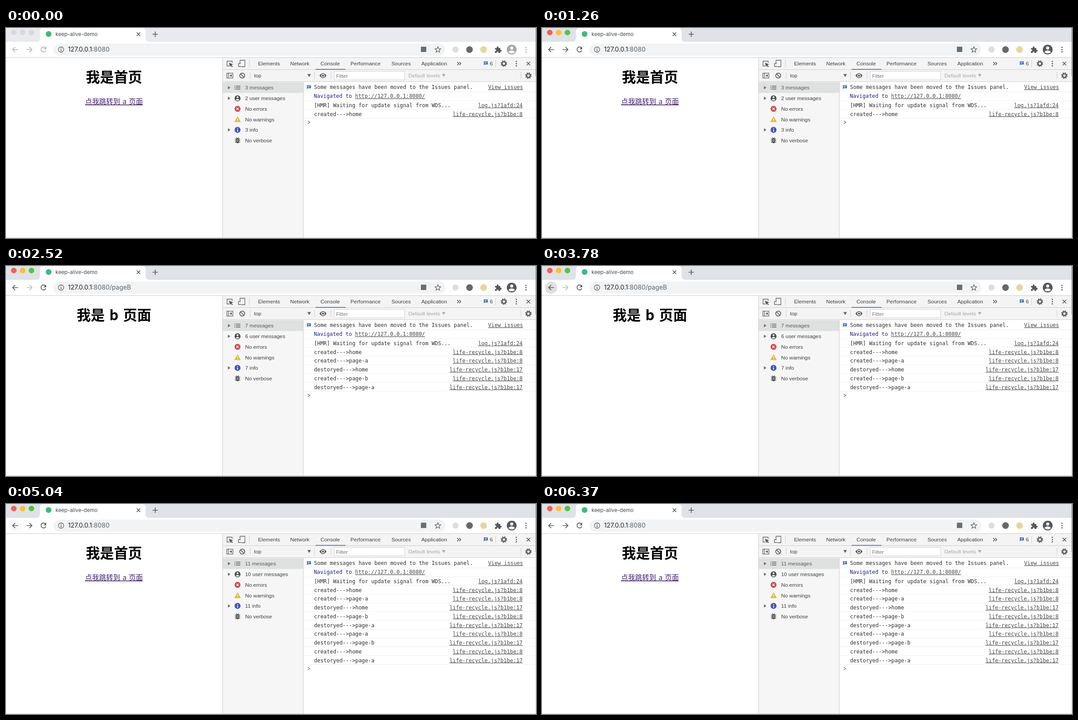
An HTML page that plays this animation: 1188 px wide and 472 px high, repeating every 6.44 s.

```html
<!DOCTYPE html>
<html lang="zh-CN">
<head>
<meta charset="utf-8">
<title>keep-alive-demo</title>
<style>
html, body { margin: 0; height: 100%; overflow: hidden; background: #fff; }
svg { display: block; width: 100vw; height: 100vh; }
text { white-space: pre; }
.bar { font: 11.7px Inter, sans-serif; fill: #45494d; }
.url { font: 14.15px Inter, sans-serif; fill: #202124; }
.page { font-family: "Noto Sans CJK SC", "Noto Sans CJK", sans-serif; text-anchor: middle; word-spacing: .1em; }
#title { font-size: 31.5px; font-weight: 700; }
#link { font-size: 15.76px; fill: #43246e; text-decoration: underline; }
.ui { font: 11.8px "Liberation Sans", Arial, sans-serif; fill: #3e3e3e; }
.log { font: 11.84px "DejaVu Sans Mono", monospace; fill: #303030; }
.src { text-anchor: end; text-decoration: underline; fill: #484848; }
.line { fill: none; stroke: #53575b; stroke-width: 1.7; }
.thin { fill: none; stroke: #606060; stroke-width: 1.3; }
.rule { stroke: #ccc; }
.row { stroke: #efefef; }
</style>
</head>
<body>
<svg viewBox="0 0 1188 472" preserveAspectRatio="none">
  <defs>
    <g id="gear" fill="none" stroke="#5c5c5c">
      <circle r="4" stroke-width="2.6"/>
      <circle r="6" stroke-width="2.4" stroke-dasharray="2.6 2.11"/>
    </g>
    <g id="dots"><circle cy="-5" r="1.5"/><circle r="1.5"/><circle cy="5" r="1.5"/></g>
    <g id="chat"><path d="M-4.5-4h9v7h-7l-2 2z" fill="#3e6fc4"/><path d="M-2.5-1.800h5M-2.500.500h3.500" stroke="#fff"/></g>
    <path id="expand" d="M-2.5-3.8L3 0L-2.5 3.8z" fill="#6e6e6e"/>
  </defs>

  <!-- tab strip -->
  <rect id="strip" width="1188" height="31"/>
  <path d="M68 31q8 0 8-8V8q0-8 8-8h221q8 0 8 8v15q0 8 8 8z" fill="#fff"/>
  <g id="lights"><circle cx="17.5" cy="10.2" r="6.2"/><circle cx="37.3" cy="10.2" r="6.2"/><circle cx="57" cy="10.2" r="6.2"/></g>
  <circle cx="95.5" cy="13.5" r="6.5" fill="#41b883"/>
  <text class="bar" x="111" y="18">keep-alive-demo</text>
  <path class="line" d="M293 10l8 8m0-8l-8 8M328.5 14h12m-6-6v12"/>

  <!-- toolbar -->
  <circle id="hover" cx="20.5" cy="48.5" r="13.8" fill="#dfe0e2"/>
  <path id="back" class="line" d="M27 48.5H15m5.5-5.7l-5.7 5.7l5.7 5.7"/>
  <path id="forward" class="line" d="M46 48.5h12m-5.5-5.7l5.7 5.7l-5.7 5.7"/>
  <g id="reload"><path class="line" d="M88.5 44.5a5.7 5.7 0 1 0 1 5.8"/><path d="M90 42v5.8h-5.8z" fill="#53575b"/></g>
  <rect x="106" y="35" width="879" height="27" rx="13.5" fill="#f1f3f4"/>
  <circle class="thin" cx="123.5" cy="48.5" r="6"/>
  <path class="line" d="M123.5 44.7v1.6m0 1.4v4.5"/>
  <text class="url" x="139" y="53">127.0.0.1<tspan id="path" fill="#5f6368"></tspan></text>
  <rect x="930" y="42" width="12" height="12" fill="#6a6e72"/>
  <path class="thin" d="M968 42l1.9 4.3l4.6.4l-3.5 3.1l1.1 4.6l-4.1-2.5l-4.1 2.5l1.1-4.6l-3.5-3.1l4.6-.4z"/>
  <circle cx="1007.5" cy="48.5" r="7" fill="#dedede"/>
  <circle cx="1039" cy="48.5" r="7.5" fill="#66696c"/>
  <circle cx="1070.5" cy="48.5" r="7.5" fill="#e3d6a0"/>
  <path d="M1096 45h4v-1.5a2 2 0 0 1 4 0V45h4v4h1a2 2 0 0 1 0 4h-1v3h-4v-1a2 2 0 0 0-4 0v1h-4v-4h1a2 2 0 0 0 0-4h-1z" fill="#55595d"/>
  <g id="user"><circle cx="1133.5" cy="48.5" r="11"/><circle cx="1133.5" cy="45" r="3.4" fill="#fff"/><path d="M1126.5 54.5c1-5.5 13-5.5 14 0q-7 5-14 0" fill="#fff"/></g>
  <use id="menu" href="#dots" x="1165.5" y="48.5" fill="#55595d"/>
  <path class="rule" d="M0 66.5h1188"/>

  <!-- page -->
  <text id="title" class="page" x="242" y="122"></text>
  <text id="link" class="page" x="242" y="171"></text>

  <!-- inspector -->
  <rect x="485" y="67" width="703" height="54" fill="#f4f4f4"/>
  <rect x="485" y="121" width="181" height="351" fill="#f6f6f6"/>
  <rect x="486" y="122" width="180" height="24" fill="#dfe0e0"/>
  <path class="rule" d="M485.5 67v405M485 93.5h703M485 120.5h703M666.5 121v351M545.5 72v16M1097.5 72v16M547.5 99v16M691.5 99v16M728.5 99v16M1154.5 99v16"/>
  <rect x="694" y="92" width="67" height="2" fill="#5487bd"/>
  <path class="thin" d="M500 85.5h-4.5v-11h11.5v4M527 86.5h-6v-6.5h5M524.5 79v-6.5h11V87h-8"/>
  <path d="M500 78l9 4l-3.6 1.4l3 3.2l-1.5 1.3l-3-3.2l-1.7 3z" fill="#555"/>
  <g id="tabs" class="ui"></g>
  <path class="line" d="M1011.5 76.5l3.3 3.5l-3.3 3.5m4.6-7l3.3 3.5l-3.3 3.5"/>
  <use href="#chat" x="1075.5" y="79"/>
  <text class="ui" x="1084.5" y="84">6</text>
  <use href="#gear" x="1116" y="80"/>
  <use href="#dots" x="1144" y="80" fill="#555"/>
  <path class="line" d="M1167 76l8 8m0-8l-8 8"/>

  <rect class="thin" x="495" y="101.5" width="13.5" height="11"/>
  <path class="thin" d="M498.5 102v10"/>
  <path d="M506 104v6l-5-3z" fill="#555"/>
  <path class="line" d="M525.5 103l8 8"/><circle class="line" cx="529.5" cy="107" r="5.6"/>
  <text class="ui" x="556" y="111">top</text>
  <path d="M675.5 103.5h8l-4 6.5z" fill="#606060"/>
  <path d="M702.5 107q8-11 16 0q-8 11-16 0" fill="#5a5a5a"/>
  <circle cx="710.5" cy="107" r="3.1" fill="#5a5a5a" stroke="#f4f4f4" stroke-width="1.6"/>
  <rect x="735.5" y="97.5" width="158" height="19" fill="#fff" stroke="#d2d2d2"/>
  <text class="ui" x="740" y="111.5" style="fill:#777">Filter</text>
  <text class="ui" x="902" y="111" style="fill:#a8a8a8">Default levels</text>
  <path d="M977.5 103.5h7.5l-3.7 6.5z" fill="#a8a8a8"/>
  <use href="#gear" x="1171" y="107"/>

  <!-- sidebar -->
  <use href="#expand" x="500" y="134"/><use href="#expand" x="500" y="158"/><use href="#expand" x="500" y="229"/>
  <path class="thin" d="M512 130.5h1.8m1.5 0h10M512 134h1.8m1.5 0h10M512 137.5h1.8m1.5 0h10"/>
  <circle cx="519" cy="158" r="6.7" fill="#505050"/><circle cx="519" cy="155.7" r="2.1" fill="#fff"/><path d="M514.8 161.5q4.2-4 8.4 0q-4.2 3-8.4 0" fill="#fff"/>
  <circle cx="519" cy="181.7" r="6.7" fill="#cf4b4f"/><path d="M516.5 179.2l5 5m0-5l-5 5" stroke="#fff" stroke-width="1.5"/>
  <path d="M519 198.3l7.3 13.2h-14.6z" fill="#e0b83c"/><path d="M519 203v4m0 1.2v1.6" stroke="#fff" stroke-width="1.5"/>
  <circle cx="519" cy="229" r="6.7" fill="#4257b2"/><path d="M519 225v1.8m0 1.4v5" stroke="#fff" stroke-width="1.8"/>
  <path class="thin" d="M513 249.5h12m-12 3.5h12m-12 3.5h12M516 246l2 2.5m4-2.5l-2 2.5"/><rect x="515.5" y="247.5" width="7" height="11.5" rx="3.5" fill="#555"/><path d="M517.5 251.5h3m-3 3h3" stroke="#f6f6f6"/>
  <g id="counts" class="ui"></g>

  <!-- console -->
  <use href="#chat" x="679" y="132.5"/>
  <text class="log" x="690.5" y="137">Some messages have been moved to the Issues panel.</text>
  <text class="log src" x="1159" y="137">View issues</text>
  <text class="log" x="690" y="157.3" style="fill:#1f1f86">Navigated to <tspan fill="#484848" text-decoration="underline">http://127.0.0.1:8080/</tspan></text>
  <path class="row" d="M667 143.5h520M667 163.5h520"/>
  <g id="rows"></g>
  <path id="prompt" d="M676.5-3.3l4.5 3.3l-4.5 3.3" fill="none" stroke-width="1.4"/>

  <path d="M1187.5 0v108" stroke="#85878a"/><path d="M1187.5 108v364M0 471.5h1188" stroke="#d5d5d5"/>
</svg>
<script>
const $ = id => document.getElementById(id);
const LOOP = 6440, FOCUS = 1000, LAG = 70, STEP = 19.75;
const pages = {
  home: ["", "我是首页", "点我跳转到 a 页面"],
  "page-a": ["/pageA", "我是 a 页面", "点我跳转到 b 页面"],
  "page-b": ["/pageB", "我是 b 页面", ""]
};
const visits = [[0, "home"], [2000, "page-a"], [2430, "page-b"], [4060, "page-a"], [4480, "home"]];

const label = (x, y, s) => `<text x="${x}" y="${y}">${s}</text>`;
$("tabs").innerHTML = [[565, "Elements"], [637, "Network"], [705, "Console"], [772, "Performance"],
  [864, "Sources"], [931, "Application"]].map(([x, s]) => label(x, 84, s)).join("");
$("counts").innerHTML = ["", "", "No errors", "No warnings", "", "No verbose"]
  .map((s, i) => label(536, 138.3 + i * 23.75, s)).join("");
const counts = $("counts").children;
counts[0].style.fill = "#585858";

const logs = [["[HMR] Waiting for update signal from WDS...", "log.js?1afd:24"]];
visits.forEach(([, name], i) => {
  logs.push(["created---&gt;" + name, "life-recycle.js?b1be:8"]);
  if (i) logs.push(["destoryed---&gt;" + visits[i - 1][1], "life-recycle.js?b1be:17"]);
});
$("rows").innerHTML = logs.map(([msg, src], i) => {
  const y = 177.8 + i * STEP;
  return `<g><text class="log" x="690.5" y="${y}">${msg}</text>
    <text class="log src" x="1158" y="${y}">${src}</text>
    <path class="row" d="M667 ${Math.floor(y + 4.7) + .5}h520"/></g>`;
}).join("");
const rows = [...$("rows").children], lights = [...$("lights").children];

const clamp = v => Math.max(0, Math.min(1, v));
const visitAt = t => visits.filter(v => v[0] <= Math.max(0, t)).length - 1;
const put = (el, s) => { if (el.textContent !== s) el.textContent = s; };

function draw(t) {
  const focused = t >= FOCUS, visit = visitAt(t), logged = visitAt(t - LAG);
  const [path, title, link] = pages[visits[visit][1]];
  put($("path"), ":8080" + path);
  put($("title"), title);
  put($("link"), link);

  const total = 3 + 2 * visit, shown = 2 + 2 * logged;
  put(counts[0], total + " messages");
  put(counts[1], total - 1 + " user messages");
  put(counts[4], total + " info");
  rows.forEach((r, i) => r.style.display = i < shown ? "" : "none");
  $("prompt").setAttribute("transform", `translate(0 ${172.5 + shown * STEP})`);
  $("prompt").setAttribute("stroke", logged > 3 ? "#777" : "#5865b5");

  $("strip").setAttribute("fill", focused ? "#dfe2e6" : "#e8eaed");
  lights.forEach((c, i) => c.setAttribute("fill", focused ? ["#f25f58", "#f9be3e", "#55c344"][i] : "#d8d9dc"));
  const dim = focused ? 1 : .45;
  for (const id of ["back", "reload", "menu"]) $(id).style.opacity = dim;
  $("forward").style.opacity = logged === 1 || logged === 2 ? .4 : dim;
  $("user").setAttribute("fill", focused ? "#54585c" : "#a4a6a8");
  $("hover").style.opacity = Math.min(clamp((t - 3600) / 150), clamp((5080 - t) / 160));
}

function tick(now) {
  draw(now % LOOP);
  requestAnimationFrame(tick);
}
draw(0);
requestAnimationFrame(tick);
</script>
</body>
</html>
```
